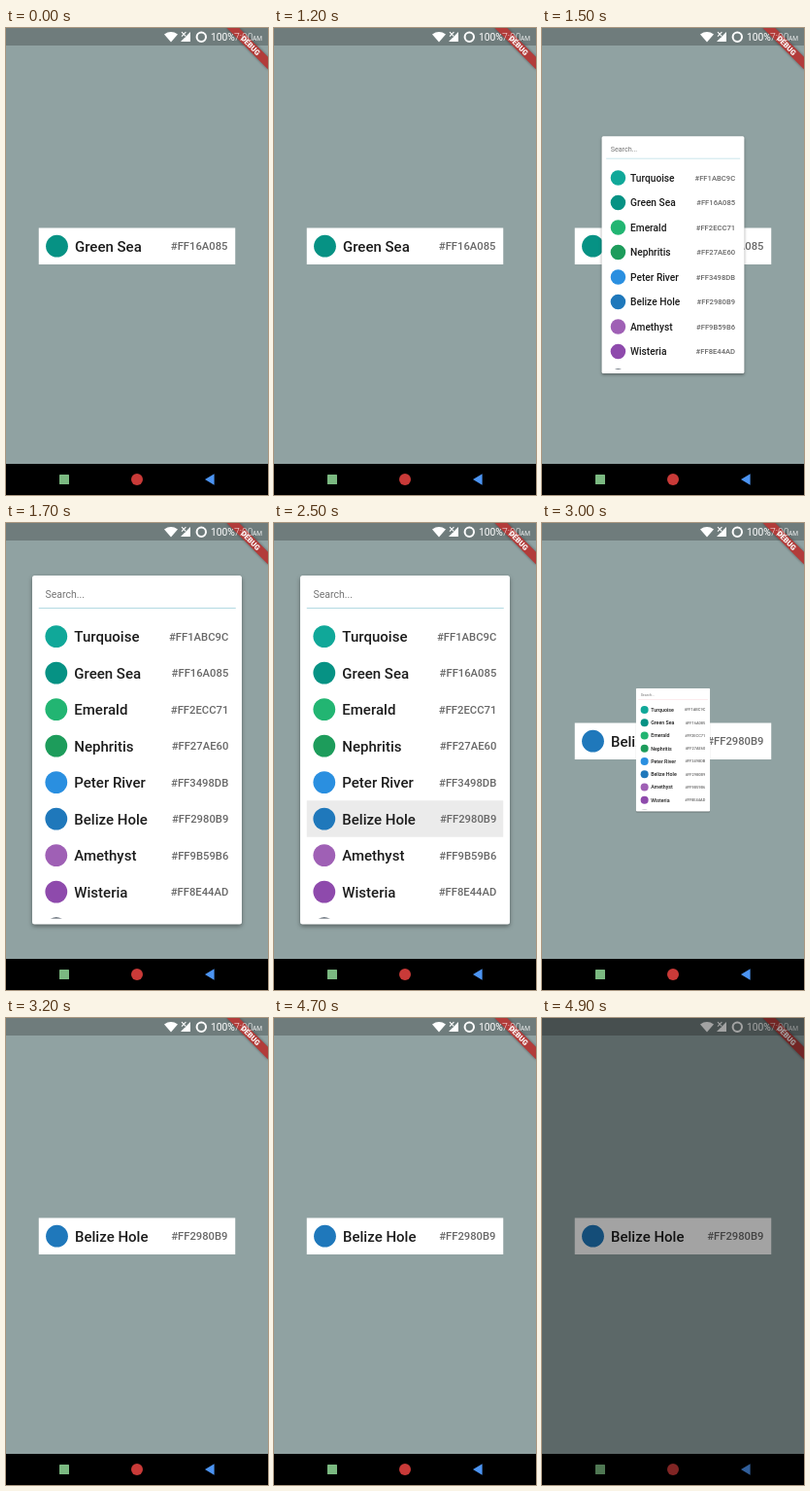
Recreate the animation shown at these times as an HTML page. Size 270x480 px, loop 5000 ms.

```html
<!DOCTYPE html>
<html lang="en">
<head>
<meta charset="utf-8">
<title>Colour picker</title>
<style>
  html, body { margin: 0; width: 100%; height: 100%; overflow: hidden; background: #000; }
  svg { display: block; width: 100%; height: 100%; font-family: Roboto, sans-serif; }
  .name { font-size: 15px; font-weight: 500; fill: #1c1c1c; }
  .hex { font-size: 11.25px; font-weight: 500; fill: #686868; text-anchor: end; }
  #card { filter: drop-shadow(0 2px 2px rgba(0, 0, 0, .4)); }
</style>
</head>
<body>
<svg viewBox="0 0 270 480">
  <defs>
    <clipPath id="listClip"><rect x="27" y="89" width="216" height="317.5"/></clipPath>
    <clipPath id="screen"><rect width="270" height="448"/></clipPath>
    <filter id="soft" x="-20%" y="-100%" width="140%" height="300%"><feGaussianBlur stdDeviation="1.6"/></filter>
  </defs>

  <rect width="270" height="448" fill="#90a2a2"/>
  <rect width="270" height="18" fill="#6f7c7c"/>

  <rect x="33.75" y="205.5" width="202.5" height="37.5" fill="#fff"/>
  <g id="picked"></g>

  <g id="card">
    <rect x="27" y="54" width="216" height="358.5" rx="2.5" fill="#fff"/>
    <text x="40.5" y="77" font-size="10.5" fill="#757575">Search...</text>
    <rect id="line" x="33.75" y="87" width="203" height="1"/>
    <g id="list" clip-path="url(#listClip)">
      <rect id="press" x="33.75" y="285.25" width="202.5" height="37.5" fill="#000"/>
    </g>
  </g>

  <g clip-path="url(#screen)">
    <g transform="translate(270 0) rotate(45)">
      <rect x="-30" y="21" width="60" height="9" fill="#000" opacity=".4" filter="url(#soft)"/>
      <rect x="-30" y="21" width="60" height="9" fill="#b23c3a"/>
      <text y="28.2" font-size="7.65" font-weight="900" fill="#fff" text-anchor="middle">DEBUG</text>
    </g>
  </g>

  <g fill="#fff">
    <path d="M163 6.4Q170 1.6 177 6.4L170 14.5Z"/>
    <path d="M190 4V14H180Z"/>
    <path d="M181 4.2L185.4 8.6M185.4 4.2L181 8.6" stroke="#6f7c7c" stroke-width="3"/>
    <path d="M181 4.2L185.4 8.6M185.4 4.2L181 8.6" stroke="#fff" stroke-width="1.1"/>
    <circle cx="201.3" cy="9.3" r="4.7" fill="none" stroke="#fff" stroke-width="2"/>
    <text x="211" y="13" font-size="10.3">100%</text>
    <text x="235" y="13" font-size="10.5" font-weight="300" opacity=".85">7:00</text>
    <text x="254" y="13" font-size="6.6" opacity=".9">AM</text>
  </g>

  <rect y="448" width="270" height="32" fill="#000"/>
  <rect x="55" y="459" width="10" height="10" rx=".6" fill="#7bb981"/>
  <circle cx="135" cy="464" r="6" fill="#c93a38"/>
  <path d="M205 464L214.6 458.2V469.8Z" fill="#4c94f2"/>

  <rect id="shade" width="270" height="480" fill="#000"/>
</svg>
<script>
const $ = id => document.getElementById(id);
const LOOP = 5000, STEP = 100, ROW = 37.5;
const OPEN = 1200, TAP = 2400, CLOSE = 2710, CLOSED = 3200, DIM = 4700;

// name, hex label, rendered swatch colour
const colors = [
  ['Turquoise', '#FF1ABC9C', '#10a899'],
  ['Green Sea', '#FF16A085', '#069284'],
  ['Emerald', '#FF2ECC71', '#22b572'],
  ['Nephritis', '#FF27AE60', '#1d9c5b'],
  ['Peter River', '#FF3498DB', '#2a8fe0'],
  ['Belize Hole', '#FF2980B9', '#1f78bb'],
  ['Amethyst', '#FF9B59B6', '#9f60b5'],
  ['Wisteria', '#FF8E44AD', '#8e4aac'],
  ['Wet Asphalt', '#FF34495E', '#3f4a57']
];

const row = ([name, hex, fill], left, right, y) =>
  `<circle cx="${left + 11.5}" cy="${y}" r="11.4" fill="${fill}"/>
   <text class="name" x="${left + 30}" y="${y + 5.5}">${name}</text>
   <text class="hex" x="${right}" y="${y + 4}">${hex}</text>`;

$('list').insertAdjacentHTML('beforeend',
  colors.map((c, i) => row(c, 40.3, 229.3, 116.6 + i * ROW)).join(''));

const clamp = x => Math.max(0, Math.min(1, x));
const ease = p => p < .5 ? 2 * p * p : 1 - 2 * (1 - p) ** 2;
const ramp = (t, start, length) => clamp((t - start) / length);

let current;
function pick(i) {
  if (i === current) return;
  current = i;
  $('picked').innerHTML = row(colors[i], 41, 228.5, 224.2);
}

function draw(t) {
  const scale = t < CLOSED ? ease(ramp(t, OPEN, 500)) - ease(ramp(t, CLOSE, 500)) : 0;
  $('card').style.display = scale > .001 ? '' : 'none';
  $('card').setAttribute('transform',
    `translate(135 233.2) scale(${scale}) translate(-135 -233.2)`);
  $('line').setAttribute('fill', t < CLOSE ? '#b3dae2' : '#f6c6cc');
  $('press').setAttribute('opacity', .08 * (ramp(t, TAP - 100, 200) - ramp(t, 2600, 200)));
  pick(t < 2800 ? 1 : 5);
  $('shade').setAttribute('opacity', .0018 * Math.max(0, t - DIM));
}

// The picture advances ten times a second.
function tick() {
  const t = performance.now() % LOOP;
  draw(Math.floor(t / STEP) * STEP);
  requestAnimationFrame(tick);
}
tick();
</script>
</body>
</html>
```
